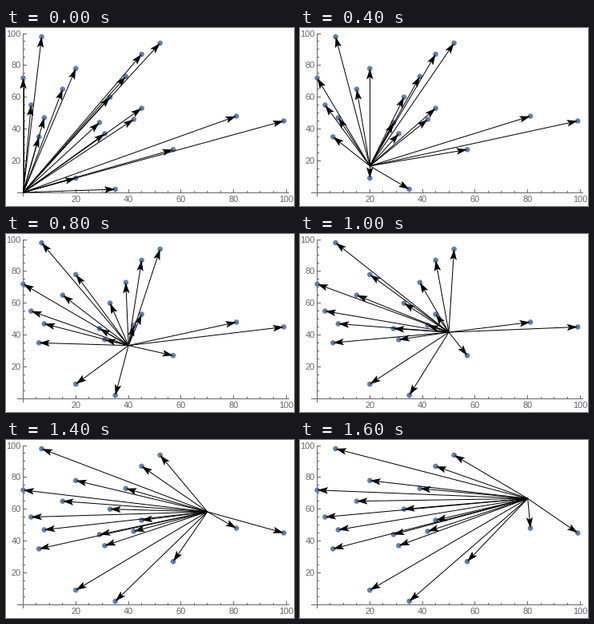
Animation of 360x223 px, one loop 1.7 s. Source, as a matplotlib script:

```python
import numpy as np
import matplotlib.pyplot as plt
from matplotlib.animation import FuncAnimation
from matplotlib.collections import LineCollection, PolyCollection
from matplotlib.patches import Circle

W, H, DPI = 360, 223, 100
PX = 72 / DPI  # points per pixel
FRAMES, INTERVAL = 17, 100

GRAY, BLUE = "#666666", "#5e81b5"
ORIGIN = np.array([21.5, 206.0])
SCALE = np.array([3.29, -1.99])
HEAD_LEN, HEAD_HALF, NOTCH = 13.5, 4.2, 0.8

# The plotted data set: vectors run from the moving tail to these points.
POINTS = [(0, 72), (7, 98), (3, 55), (6, 35), (8, 47), (15, 65), (20, 78),
          (33, 60), (39, 73), (45, 87), (52, 94), (29, 44), (31, 37), (42, 46),
          (45, 53), (57, 27), (81, 48), (99, 45), (20, 9), (35, 2)]


def to_px(p):
    return ORIGIN + SCALE * np.asarray(p, float)


def snap(v):
    return np.floor(v) + 0.5


def arrow_head(tip, tail):
    along = (tip - tail) / np.hypot(*(tip - tail))
    side = HEAD_HALF * np.array([-along[1], along[0]])
    back = tip - HEAD_LEN * along
    return [tip, back + side, tip - NOTCH * HEAD_LEN * along, back - side]


fig = plt.figure(figsize=(W / DPI, H / DPI), dpi=DPI, facecolor="white")
ax = fig.add_axes([0, 0, 1, 1])
ax.set(xlim=(0, W), ylim=(H, 0))
ax.axis("off")


def line(x, y):
    # Coordinates already sit on pixel centres, so snapping stays off.
    ax.plot(x, y, color=GRAY, lw=PX, solid_capstyle="butt", snap=False, zorder=1)


def label(x, y, value, ha):
    ax.text(x, y, str(value), color=GRAY, fontsize=11 * PX, ha=ha,
            va="center_baseline", family="Liberation Sans")


def draw_axes():
    x0, y0 = snap(ORIGIN)
    line([14, 354], [y0, y0])
    line([x0, x0], [7, 211])
    for v in range(0, 101, 5):
        major = v % 20 == 0
        size = 4.5 if major else 2.5
        x, y = snap(to_px((v, v)))
        line([x, x], [y0, y0 - size])
        line([x0, x0 + size], [y, y])
        if v and major:
            label(x - 0.3, 214.2, v, "center")
            label(18.5, y - 0.8, v, "right")


draw_axes()
tips = to_px(POINTS)
for tip in tips:
    ax.add_patch(Circle(tip, 3.3, color=BLUE, lw=0, zorder=2))
shafts = LineCollection([], colors="black", linewidths=PX, zorder=3)
heads = PolyCollection([], facecolors="black", linewidths=0, zorder=4)
ax.add_collection(shafts)
ax.add_collection(heads)


def update(i):
    # The shared tail moves along a straight line at constant speed.
    tail = to_px((5 * i, 25 * i / 6))
    polys = [arrow_head(tip, tail) for tip in tips]
    shafts.set_segments([(tail, poly[2]) for poly in polys])
    heads.set_verts(polys)
    return shafts, heads


anim = FuncAnimation(fig, update, frames=FRAMES, interval=INTERVAL,
                     init_func=lambda: update(0), repeat=True, repeat_delay=0)
plt.show()
```
